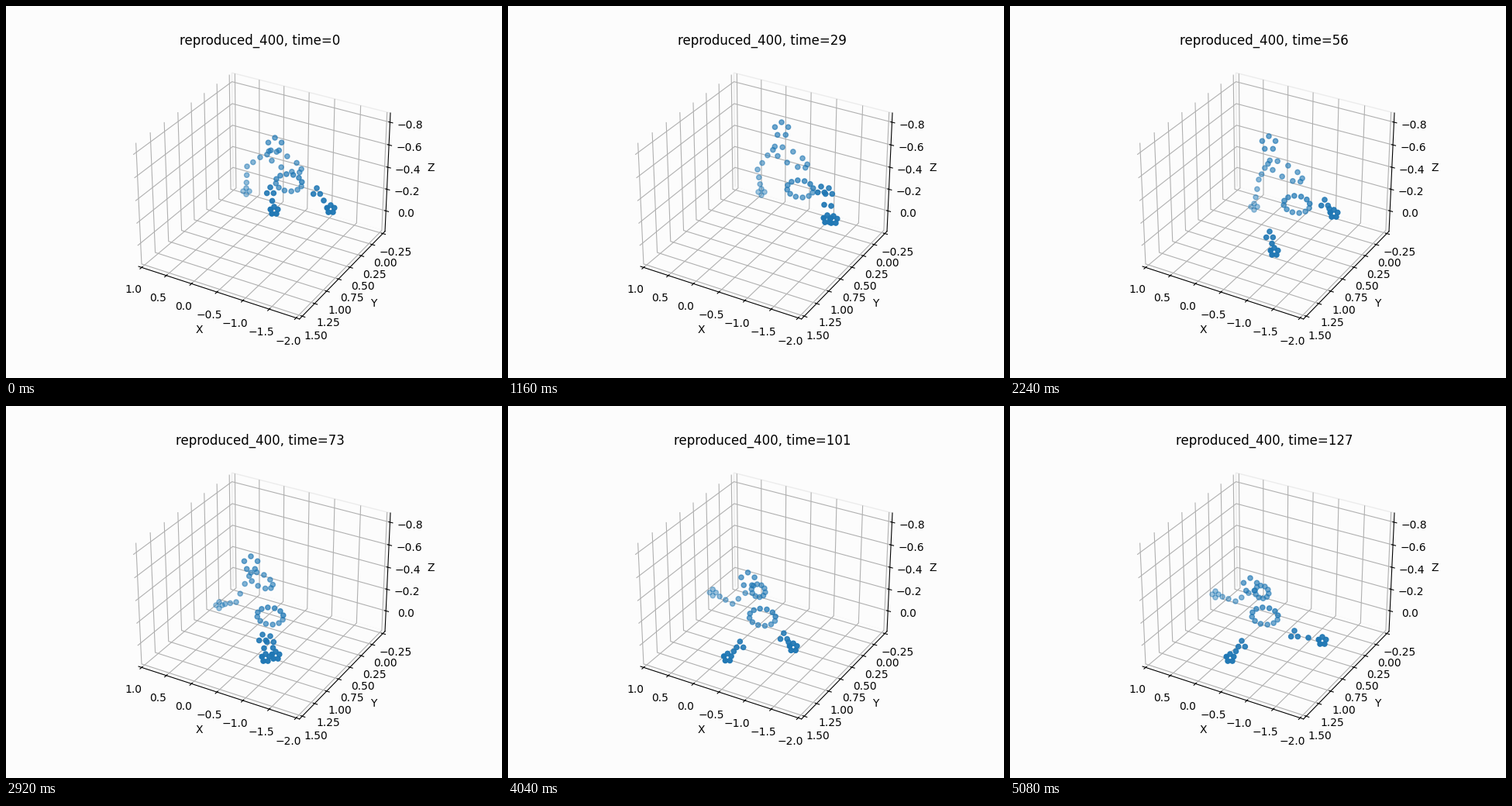
A matplotlib script for the animation above (5120 ms loop, 640x480 px).

```python
import numpy as np
import matplotlib.pyplot as plt
from matplotlib.animation import FuncAnimation

W, H, DPI = 640, 480, 100
FRAMES, STEP = 128, 40
PAPER = "#fcfcfc"
BLUE = (0x1f / 255, 0x77 / 255, 0xb4 / 255)


def path(*keys):
    """Smooth curve through (time, x, y) keys, at rest at both ends."""
    keys = np.array(keys, float)
    times, points = keys[:, 0], keys[:, 1:]
    slopes = np.gradient(points, times, axis=0)
    slopes[[0, -1]] = 0

    def at(t):
        t = min(t, times[-1])
        i = min(np.searchsorted(times, t, side="right"), len(times) - 1) - 1
        span = times[i + 1] - times[i]
        s = (t - times[i]) / span
        ease = s * s * (3 - 2 * s)
        return (points[i] + (points[i + 1] - points[i]) * ease
                + span * s * (1 - s) ** 2 * slopes[i]
                - span * s * s * (1 - s) * slopes[i + 1])

    return at


# Joints of the walking figure, in stage pixels
head = path((0, 347, 179), (29, 353, 159), (56, 334, 177),
            (73, 316, 203), (113, 310, 228), (127, 310, 231))
chest = path((0, 359, 201), (29, 364, 195), (56, 355, 213),
             (73, 329, 225), (113, 325, 240))
elbow = path((0, 311, 207), (29, 322, 211), (56, 321, 224),
             (73, 297, 253), (113, 291, 252))
hand = path((0, 310, 239), (29, 327, 240), (56, 315, 259),
            (73, 275, 257), (113, 266, 238), (127, 265, 243))
pelvis = path((0, 365, 228), (29, 377, 236), (56, 370, 256),
              (73, 341, 271), (113, 329, 271))
near_knee = path((0, 341, 239), (29, 404, 238), (56, 335, 296),
                 (73, 331, 300), (89, 306, 308), (113, 299, 308))
near_foot = path((0, 346, 264), (14, 372, 284), (29, 412, 275),
                 (36, 438, 284), (42, 420, 293), (56, 341, 317),
                 (73, 335, 325), (89, 293, 324), (113, 284, 325))
far_knee = path((0, 401, 240), (29, 414, 240), (56, 406, 255),
                (73, 341, 302), (89, 342, 302), (113, 367, 295))
far_foot = path((0, 419, 262), (29, 420, 276), (56, 418, 268),
                (73, 348, 322), (89, 344, 318), (113, 395, 305),
                (127, 403, 303))


def ring(center, n, radius):
    a = 2 * np.pi * np.arange(n) / n - np.pi / 2
    return center + radius * np.column_stack([np.cos(a), np.sin(a)])


def band(center, half, n, depth):
    """Markers on an ellipse whose long axis runs along half."""
    a = 2 * np.pi * (np.arange(n) + 0.5) / n
    side = np.array([-half[1], half[0]]) / np.hypot(*half)
    return center + np.outer(np.cos(a), half) + np.outer(np.sin(a), depth * side)


def between(a, b, *shares):
    return np.array([a + (b - a) * s for s in shares])


def leg(knee, foot):
    return np.vstack([ring(knee, 3, 5), between(knee, foot, 0.5),
                      ring(foot, 5, 5)])


def markers(t):
    # the shoulders turn away from the viewer
    width = np.interp(t, [56, 89], [22, 8])
    half = np.array([width, 0.55 * width])
    mid = chest(t)
    shoulder, bend, palm = mid - half, elbow(t), hand(t)
    arm = np.vstack([between(shoulder, bend, 0.35, 0.7, 1),
                     between(bend, palm, 0.35, 0.65), ring(palm, 4, 4)])
    parts = [  # markers, first and last shade
        (arm, 0.55, 0.42),
        (ring(head(t), 5, 9), 0.65, 0.65),
        (band(mid, half, 10, 8), 0.6, 0.6),
        (band(pelvis(t), np.array([17, 2]), 12, 11), 0.6, 0.75),
        (leg(near_knee(t), near_foot(t)), 0.86, 1),
        (leg(far_knee(t), far_foot(t)), 0.84, 1),
    ]
    spots = np.vstack([p for p, _, _ in parts])
    shades = np.concatenate([np.linspace(a, b, len(p)) for p, a, b in parts])
    return spots, [(*BLUE, a) for a in shades]


fig = plt.figure(figsize=(W / DPI, H / DPI), dpi=DPI, facecolor=PAPER)
ax = fig.add_subplot(projection="3d", facecolor=PAPER)
ax.set_xlim(1.0625, -2.0625)
ax.set_ylim(1.554, -0.302)
ax.set_zlim(0.1915, -0.88)
ax.set(xlabel="X", ylabel="Y", zlabel="Z")
for axis in (ax.xaxis, ax.yaxis, ax.zaxis):
    axis.set_pane_color(PAPER)
ax.yaxis.pane.set_edgecolor("#ececec")
title = ax.set_title("")

# Markers lie on a sheet measured in stage pixels
sheet = fig.add_axes([0, 0, 1, 1])
sheet.set(xlim=(0, W), ylim=(H, 0))
sheet.axis("off")
dots = sheet.scatter(*markers(0)[0].T, s=20, color=markers(0)[1])


def draw(t):
    spots, colors = markers(t)
    dots.set_offsets(spots)
    dots.set_color(colors)
    title.set_text(f"reproduced_400, time={t}")
    return dots, title


anim = FuncAnimation(fig, draw, frames=FRAMES, interval=STEP, repeat=True,
                     repeat_delay=0, init_func=lambda: draw(0))
plt.show()
```
